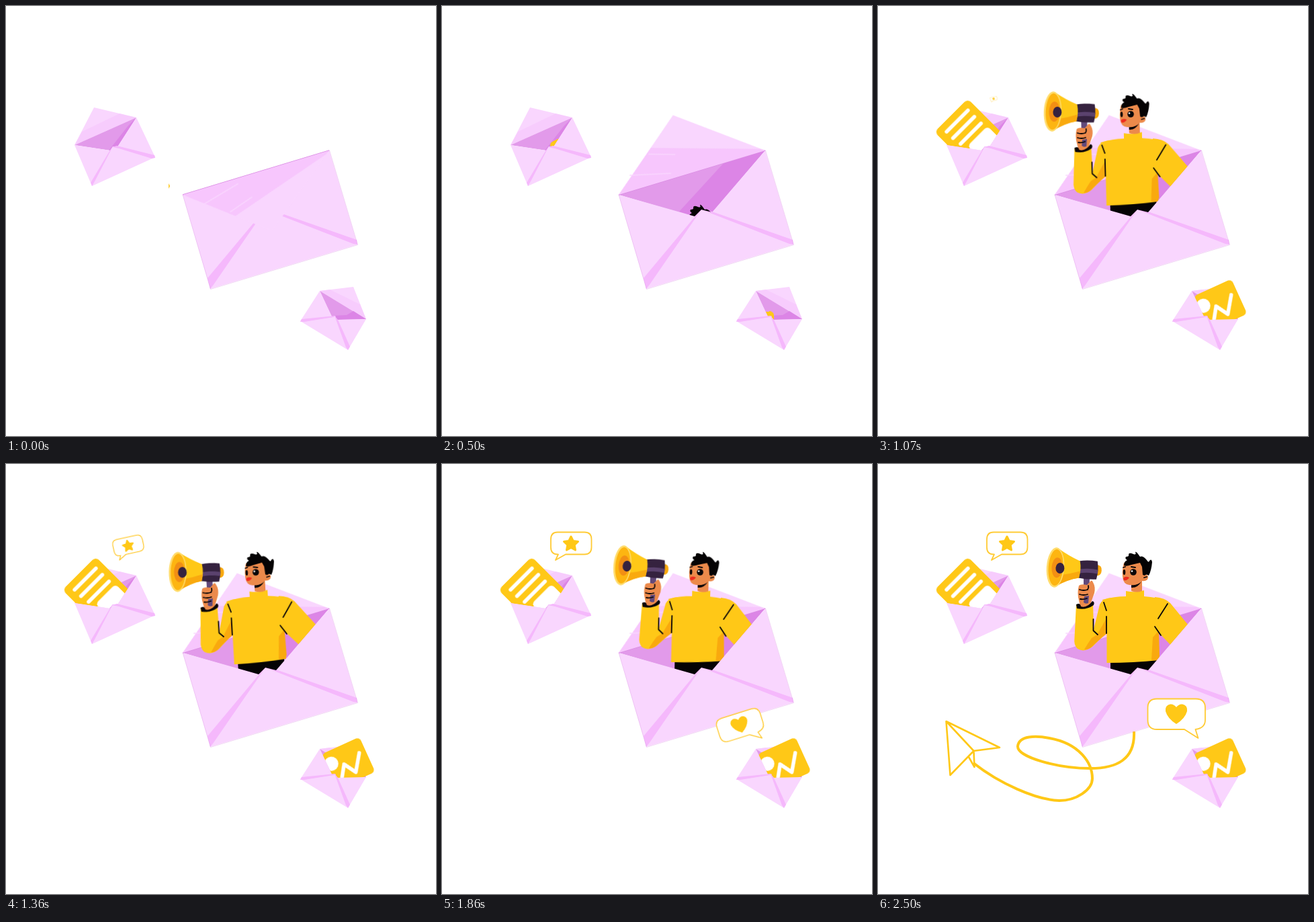
An HTML page that plays this animation: 640x640 px, repeating every 3570 ms.

```html
<!DOCTYPE html>
<html lang="en">
<head>
<meta charset="utf-8">
<title>Mail announcement</title>
<style>
  html, body { margin: 0; height: 100%; overflow: hidden; background: #fff; }
  svg { display: block; width: 100vw; height: 100vh; }

  /* One second stands for one step; 50 steps make the loop, so step n is at 2n%. */
  .a { animation: 50s linear infinite paused; animation-delay: calc(var(--n, 0) * -1s); }
  .flap { animation-name: open; }
  .rise { animation-name: rise; }
  .sway { animation-name: sway; animation-timing-function: ease-in-out; transform-origin: 380px 310px; }
  .note { animation-name: note; transform-origin: 87px 186px; }
  .photo { animation-name: photo; transform-origin: 524px 409px; }
  .heart, .star { animation-name: pop; }
  .heart { transform-origin: 476px 408px; }
  .star { transform-origin: 169px 143px; animation-delay: calc((var(--n, 0) + 6.7) * -1s); }
  .trail { animation-name: draw; stroke-dasharray: 1 2; }
  .plane {
    animation-name: fly;
    offset-path: path("M381 398C383 440 355 453 316 453C270 453 207 437 208 420C210 404 235 404 255 408C300 416 319 445 319 468C319 485 295 501 270 501C235 500 180 475 142 445");
  }
  .glint { animation-name: glint; }

  @keyframes open {
    0%, 1% { transform: scaleY(1); animation-timing-function: ease-in-out; }
    12%, 100% { transform: scaleY(-1); }
  }
  @keyframes rise {
    0%, 10% { transform: translate(0, 210px); }
    14% { transform: translate(1px, 165px); }
    18% { transform: translate(2px, 115px); }
    22% { transform: translate(3px, 68px); }
    26% { transform: translate(1px, 20px); }
    28% { transform: translate(0, 4px); }
    30%, 100% { transform: none; }
  }
  @keyframes sway {
    0%, 24% { transform: rotate(0); }
    30% { transform: rotate(-1.5deg); animation-timing-function: ease-out; }
    37% { transform: rotate(-3.2deg); animation-timing-function: ease-in; }
    44% { transform: rotate(-2.7deg); animation-timing-function: linear; }
    52% { transform: rotate(1.6deg); animation-timing-function: ease-out; }
    56% { transform: rotate(2deg); }
    64%, 100% { transform: rotate(0); }
  }
  @keyframes note {
    0%, 12% { transform: translate(100px, 26px) rotate(25deg); }
    14% { transform: translate(75px, 18px) rotate(20deg); }
    16% { transform: translate(44px, 11px) rotate(12deg); }
    18% { transform: translate(21px, 5px) rotate(6deg); }
    22%, 100% { transform: none; }
  }
  @keyframes photo {
    0%, 12% { transform: translate(-42px, 66px) rotate(26deg); }
    14% { transform: translate(-33px, 47px) rotate(22deg); }
    16% { transform: translate(-22px, 28px) rotate(13deg); }
    18% { transform: translate(-10px, 13px) rotate(6deg); }
    22%, 100% { transform: none; }
  }
  @keyframes pop {
    0%, 41% { transform: rotate(0) scale(0); }
    44% { transform: rotate(-15deg) scale(.22); }
    48% { transform: rotate(17deg) scale(.47); }
    52% { transform: rotate(-17.500deg) scale(.79); }
    56% { transform: rotate(4deg) scale(.97); }
    58%, 100% { transform: rotate(0) scale(1); }
  }
  @keyframes draw {
    0%, 56.6% { stroke-dashoffset: 1; }
    70%, 100% { stroke-dashoffset: 0; }
  }
  @keyframes fly {
    0%, 56.6% { offset-distance: 0%; visibility: hidden; }
    56.7% { visibility: visible; }
    70%, 100% { offset-distance: 100%; visibility: visible; }
  }
  @keyframes glint {
    0%, 1% { visibility: visible; }
    1.01%, 100% { visibility: hidden; }
  }

  .y { fill: #ffc817; }
  .o { fill: #f9a90e; }
  .p { fill: #f9d6fe; }
  .ps { fill: #f7c6fd; }
  .seam { fill: #f5b8fc; }
  .in { fill: #e29aea; }
  .in2 { fill: #dc85e6; }
  .skin { fill: #ec8a4b; }
  .dark { fill: #35223f; }
  .w { fill: #fff; }
  .line { fill: none; stroke: #ffc817; stroke-linejoin: round; }
  .white { fill: none; stroke: #fff; stroke-width: 5.5; stroke-linecap: round; stroke-linejoin: round; }
  .ink { fill: none; stroke: #0a0608; stroke-width: 1.8; stroke-linecap: round; stroke-linejoin: round; }
  .bubble { fill: #fff; stroke: #ffcb35; stroke-width: 1.8; stroke-linejoin: round; }
</style>
</head>
<body>
<svg viewBox="0 0 640 640">
  <defs>
    <clipPath id="bigMouth"><path d="M0 0H640V30L481 215L402 307L386 303L376 313L263 281L0 207Z"/></clipPath>
    <clipPath id="leftMouth"><path d="M0 0H330L194 166L165 211L159 209L154 215L102 207L0 190Z"/></clipPath>
    <clipPath id="rightMouth"><path d="M440 340H640V467L536 467L492 467L490 461L485 462L467 424Z"/></clipPath>
  </defs>

  <!-- paper plane -->
  <path class="a trail line" pathLength="1" stroke-width="4" d="M381 398C383 440 355 453 316 453C270 453 207 437 208 420C210 404 235 404 255 408C300 416 319 445 319 468C319 485 295 501 270 501C235 500 180 475 142 445"/>
  <g class="a plane">
    <path class="line" stroke-width="2.6" transform="rotate(141.7) translate(-142 -445)" d="M101.500 383L181 422L142.500 427L107.500 463ZL142.500 427L143.500 451L135 436"/>
  </g>

  <!-- left envelope -->
  <path class="p" d="M102 207L131 151L194 166Z"/>
  <path class="ps" opacity=".6" d="M102 207L113 187L169 160L194 166Z"/>
  <path class="in" d="M102 207L194 166L165 211L155 215Z"/>
  <path class="in2" d="M194 166L165 211L153 215L182 178Z"/>
  <g clip-path="url(#leftMouth)">
    <g class="a note">
      <g transform="translate(133.500 138) rotate(45)">
        <rect class="y" width="95" height="70" rx="7"/>
        <path class="white" d="M12.500 12V57M26 12V57M40 12V55"/>
        <rect class="w" x="49.500" y="8" width="40" height="42" rx="6"/>
      </g>
    </g>
  </g>
  <path class="p" d="M102 207L155 215L159 209L165 211L194 166L222 225L128 268Z"/>
  <path class="seam" d="M159 209L154 216L126 263L128 268L132 261ZM158 210L165 208L221 222L222 226L217 227L168 212Z"/>

  <!-- right envelope -->
  <path class="p" d="M467 424L517 418L536 466Z"/>
  <path class="ps" opacity=".6" d="M467 424L482 422L527 444L536 466Z"/>
  <path class="in" d="M467 424L536 466L491 467L484 461Z"/>
  <path class="in2" d="M536 466L491 467L485 461L507 460L517 454Z"/>
  <g clip-path="url(#rightMouth)">
    <g class="a photo">
      <g transform="translate(469.500 432) rotate(-24.500)">
        <rect class="y" width="62" height="57" rx="6"/>
        <circle class="w" cx="7.500" cy="19" r="10.500"/>
        <path class="white" d="M14 43.500L24.500 27.500L35.500 45.500L52 21.500"/>
      </g>
    </g>
  </g>
  <path class="p" d="M467 424L485 462L490 461L492 467L536 466L509 512L438 469Z"/>
  <path class="seam" d="M490 461L440 466L438 470L444 470L488 463ZM489 461L494 467L512 507L509 512L506 508Z"/>

  <!-- large envelope -->
  <path class="in" d="M263 281L481 215L402 307L386 304L376 314Z"/>
  <path class="in2" d="M419 234L481 215L402 308L386 304L376 314L353 306Z"/>
  <path class="p" d="M263 281L376 313L386 303L402 307L481 215L523 355L304 421Z"/>
  <path class="seam" d="M386 303L376 314L300 405L304 421L308 416ZM386 303L402 306L522 348L523 355L517 354Z"/>
  <path d="M263 281L304.500 421.500L523.500 355.500L481.500 215" fill="none" stroke="#d88fe0" stroke-width=".6" opacity=".6"/>
  <g transform="translate(263 281) rotate(-16.850)">
    <path d="M0 0H228" stroke="#d98be2" stroke-width="1.400"/>
    <g class="a flap">
      <path class="p" d="M0 0H227.800L111.700 90Z"/>
      <path class="ps" d="M0 0H227.800L222 4L66 53Z"/>
      <path d="M24 23L84 8M60 45L98 33" stroke="#f9d6fe" stroke-width="1.500"/>
    </g>
  </g>

  <!-- speaker -->
  <g clip-path="url(#bigMouth)">
    <g class="a rise"><g class="a sway">
      <path d="M346 290H415V345H346Z" fill="#050304"/>
      <!-- raised arm -->
      <path class="y" d="M295 209Q308 217 320 206L321 246L330 209Q335 199 350 199L346 246Q331 260 319 272Q307 281 297 275Q291 270 292.500 258Z"/>
      <path class="o" d="M341 228V252Q326 264 317 273Q311 277 307 276Q313 266 318 259L326 254Z"/>
      <!-- far arm -->
      <path class="y" d="M412 198Q427 199 435 207L466 245L438 272L410 243Z"/>
      <!-- torso -->
      <path class="y" d="M334 202Q352 197 369 197V189Q383 192 396 188V197Q416 198 431 205L418 245V292Q380 296 340.500 296V240Z"/>
      <path class="o" d="M409 258L418 248L419 286L417 292H407Z"/>
      <path class="ink" d="M336 206L340 218M340 227V252M320.500 231V248L327 254M431 208L417 230M412 242L421 255"/>
      <!-- neck and head -->
      <path class="skin" d="M377 172H393V189Q385 192 377 189Z"/>
      <path d="M377 180Q386 181 392 175Q386 185 377 184Z" fill="#0a0608"/>
      <path class="skin" d="M366 147Q363 158 364 168Q365 179 374 180Q386 181 393 174Q402 175 402 168Q401 163 396 165L397 148Q382 142 366 147Z"/>
      <path d="M366 151Q369 153 377 150L390 147L393 153L394 165L397 166Q399 163 403 166Q407 158 408 146Q407 140 404 144Q403 148 400 143Q394 136 390 138Q384 129 383 131Q385 136 380 134Q373 131 373 135Q374 138 369 138Q367 141 371 143Q366 145 366 151Z" fill="#050304"/>
      <circle cx="380" cy="161" r="4.800" fill="#0a0608"/>
      <circle class="w" cx="378" cy="159.500" r="1.300"/>
      <ellipse cx="366.500" cy="161" rx="1.800" ry="4" fill="#0a0608"/>
      <path class="ink" stroke-width="1.400" d="M365 154L368 153M377 153L383 154M396 169L400 168"/>
      <path d="M365 170Q368 166 374 169Q371 174 366 173Z" fill="#ee2b1e"/>
      <!-- hand -->
      <path d="M306 170L315 170L314 206Q309 209 306 206Z" fill="#62497a"/>
      <path class="skin" d="M299 181Q302 178 311 180L315 176Q318 171 320 176Q324 183 322 192L317 206L315 212Q308 216 301 212L299 203Q296 192 299 181Z"/>
      <path d="M307 197L314 196L313 207Q309 209 306 206Z" fill="#62497a"/>
      <path class="ink" d="M300 187Q306 189 312 187M300 194Q306 196 312 194M301 201Q306 202 311 200M313 181Q314 184 312 187"/>
      <path d="M295 209Q301 206 302 212Q311 215 319 204Q323 205 321 210Q310 218 296 215Z" fill="#0a0608"/>
      <!-- megaphone, along its own axis -->
      <g transform="translate(264 154) rotate(4)">
        <path class="o" d="M62 -8Q69 -8 69 0Q69 8 62 8Z"/>
        <path class="dark" d="M34 -12Q48 -15 62 -13.500Q65 0 62 13.500Q48 15 34 13Z"/>
        <path d="M36 0Q50 -3 63.500 -1V5Q50 3 36 6Z" fill="#5b426e"/>
        <path class="y" d="M2 -29Q18 -19 36 -12Q39 0 36 13Q18 17 2 28Z"/>
        <path class="o" d="M7 11Q23 8 37 3L36 13Q18 17 3 28Z"/>
        <ellipse rx="13.200" ry="29.700" fill="#ffdc6b"/>
        <ellipse cx=".6" rx="11" ry="27" fill="#fdb511"/>
        <ellipse cx="2.500" rx="8" ry="15" fill="#f28f14"/>
        <ellipse class="dark" cx="7" cy=".5" rx="6.500" ry="8"/>
      </g>
    </g></g>
  </g>
  <path class="a glint y" d="M242 264L244 268L242 272Z"/>

  <!-- speech bubbles -->
  <g class="a star">
    <path class="bubble" d="M172 101.500H212Q222.500 101.500 222.500 112V124Q222.500 134.500 212 134.500H184L169 143L173 134.500H172Q162 134.500 162 124V112Q162 101.500 172 101.500Z"/>
    <path class="y" stroke="#ffc817" stroke-width="3" stroke-linejoin="round" d="M192 108L195.200 114.500L202.500 115.500L197.200 120.500L198.500 128L192 124.400L185.500 128L186.800 120.500L181.500 115.500L188.800 114.500Z"/>
  </g>
  <g class="a heart">
    <path class="bubble" d="M415 349.500H473Q487 349.500 487 363V381Q487 393 472.500 395L476.500 408L456 395H415Q401.500 395 401.500 381V363Q401.500 349.500 415 349.500Z"/>
    <path class="y" d="M444 362Q448 357 453 357.500Q461 359 460 368Q457 379 444 387Q431 379 428 368Q427 359 435 357.500Q440 357 444 362Z"/>
  </g>
</svg>
<script>
  const LOOP = 3570, RATE = 14, LAST = 35;
  const root = document.documentElement;
  function tick() {
    const t = performance.now() % LOOP;
    const n = Math.min(LAST, Math.floor((t + 4) * RATE / 1000));
    root.style.setProperty('--n', n);
    requestAnimationFrame(tick);
  }
  tick();
</script>
</body>
</html>
```
